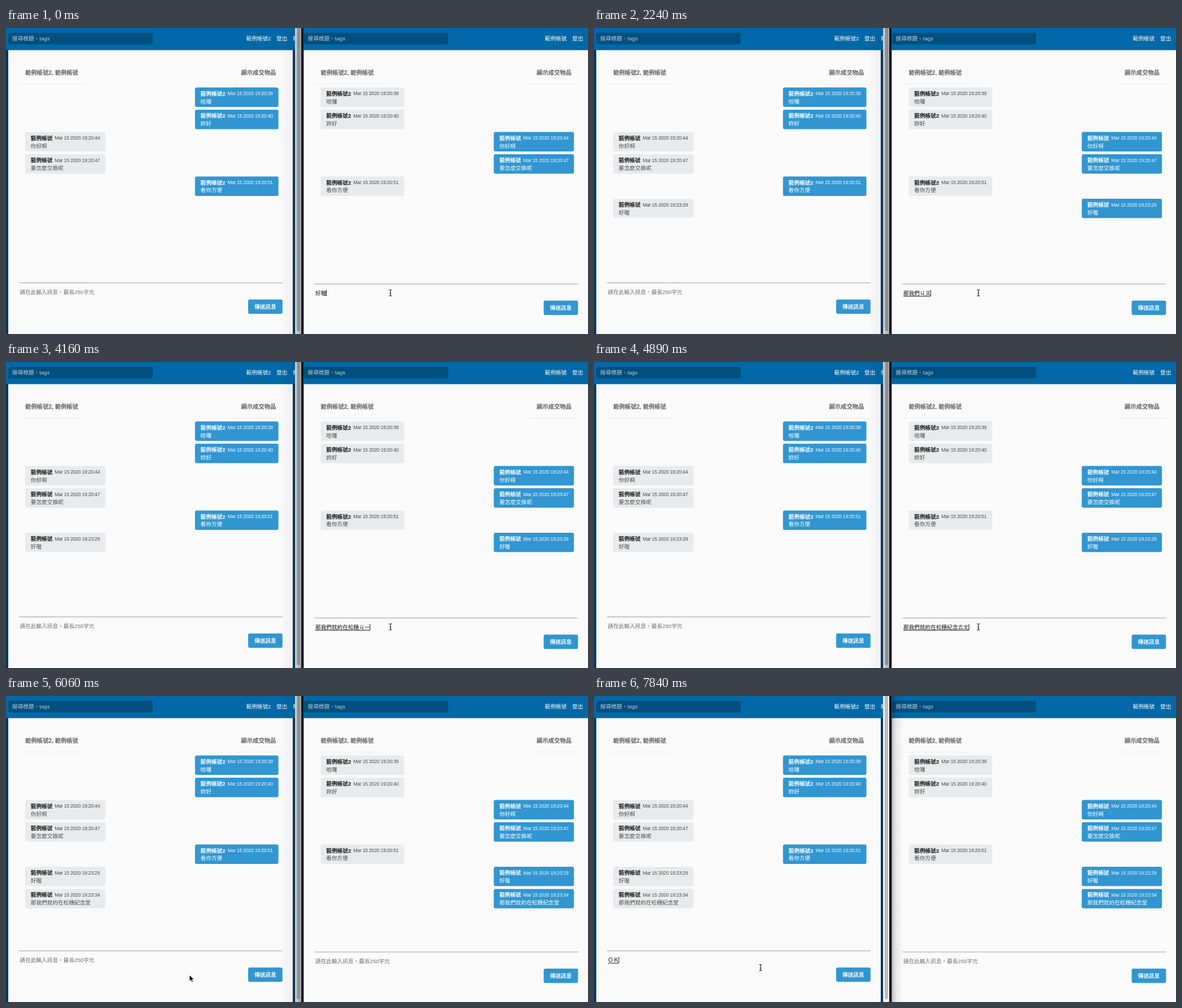
An HTML page that plays this animation: 1031x543 px, repeating every 8 s.

```html
<!DOCTYPE html>
<html lang="zh-Hant">
<head>
<meta charset="utf-8">
<title>Chat</title>
<style>
html, body { margin: 0; width: 100%; height: 100%; overflow: hidden; background: #fafafa; }
svg { display: block; width: 100vw; height: 100vh; }
text { font-family: "Liberation Sans", "Noto Sans CJK TC", "Noto Sans CJK", sans-serif; white-space: pre; }
</style>
</head>
<body>
<svg id="stage" viewBox="0 0 1031 543"></svg>
<script>
const LOOP = 8000, EM = 9.67, ROW = 39.47;
const ME = '範例帳號', PEER = '範例帳號2';
const HINT = '請在此輸入訊息，最長250字元';
const PLACE = '那我們就約在松穗紀念堂';

// sender, time, body, moment it appears
const chat = [
  [PEER, '19:20:39', '哈囉', 0],
  [PEER, '19:20:40', '妳好', 0],
  [ME, '19:20:44', '你好啊', 0],
  [ME, '19:20:47', '要怎麼交換呢', 0],
  [PEER, '19:20:51', '看你方便', 0],
  [ME, '19:23:29', '好喔', 450],
  [ME, '19:23:34', PLACE, 5330]
];

// moment, finished characters of PLACE, phonetic keys still being composed
const typing = [
  [890, 0, 'ㄋㄚ'], [1040, 1, ''],
  [1340, 1, 'ㄨ'], [1490, 2, ''],
  [1790, 2, 'ㄇㄣ'], [1940, 3, ''],
  [2240, 3, 'ㄐㄡ'], [2390, 4, ''], [2540, 4, 'ㄩㄝ'], [2680, 5, ''],
  [2980, 5, 'ㄗㄞ'], [3130, 6, ''], [3270, 6, 'ㄨ'], [3420, 6, 'ㄙㄨㄥ'], [3560, 7, ''],
  [3860, 7, 'ㄙㄨ'], [4010, 8, ''], [4150, 8, 'ㄐㄧ'], [4300, 9, ''],
  [4450, 9, 'ㄋㄧㄢ'], [4600, 10, ''], [4740, 10, 'ㄊ'], [4890, 10, 'ㄊㄤ'], [5030, 11, '']
];

// moment, x, y, shape
const pointer = [
  [0, 681, 470, 'beam'], [5620, 676, 480, 'arrow'], [5770, 548, 500, 'arrow'],
  [5910, 400, 505, 'arrow'], [6060, 325, 495, 'arrow'],
  [6210, 304, 487, 'arrow'], [6360, 295, 482, 'beam']
];

const latest = (list, t) => list.filter(s => s[0] <= t).pop();
const rect = (x, y, w, h, fill, r = 0) =>
  `<rect x="${x}" y="${y}" width="${w}" height="${h}" rx="${r}" fill="${fill}"/>`;
const label = (x, mid, s, fill, { size = EM, weight = 400, gap = 0 } = {}) =>
  `<text x="${x}" y="${mid + size * 0.37}" font-size="${size}" font-weight="${weight}" letter-spacing="${gap}" fill="${fill}">${s}</text>`;
const group = (id, body) => `<g id="${id}">${body}</g>`;
const shade = (id, x1, x2, stops) =>
  `<linearGradient id="${id}" gradientUnits="userSpaceOnUse" x1="${x1}" x2="${x2}" y1="0" y2="0">` +
  stops.map(([o, a]) => `<stop offset="${o}" stop-color="#000" stop-opacity="${a}"/>`).join('') + '</linearGradient>';

function bubble(dx, owner, [who, time, body], i) {
  const own = who === owner;
  const w = who === PEER ? 147.8 : 142;
  const x = dx + (own ? 482.6 - w : 34), y = 105.6 + i * ROW;
  const tx = x + 9.8;
  return group(`msg-${owner === ME ? 'r' : 'l'}${i}`,
    rect(x, y, w, 34.4, own ? '#3196d1' : '#e9eaec', 3) +
    label(tx, y + 10.5, who, own ? '#fff' : '#161616', { weight: 700 }) +
    label(tx + (who === PEER ? 48 : 42.4), y + 10.6, 'Mar 15 2020 ' + time, own ? '#f2f8fc' : '#4c4c4c', { size: 8.8, gap: -0.3 }) +
    label(tx, y + 24.4, body, own ? '#fff' : '#4c4c4c'));
}

function win(dx, dy, owner) {
  const head = { size: 10.3, weight: 700 };
  return rect(dx + 4, 39, 504, 504, '#fafafa') +
    rect(dx + 4, 0, 508, 39.3, '#0368a7') +
    rect(dx + 4, 8.5, 255.8, 20.5, '#014f7e', 3) +
    label(dx + 11, 18.7, '搜尋標題、tags', '#b9cbd8') +
    label(dx + 34, 79, `${PEER}, ${ME}`, '#626262', head) +
    label(dx + 416.5, 79, '顯示成交物品', '#626262', head) +
    rect(dx + 23, 99, 117, 1, '#ebebeb') +
    rect(dx + 404.5, 99, 85.5, 1, '#ebebeb') +
    chat.map((m, i) => bubble(dx, owner, m, i)).join('') +
    rect(dx + 23, 451.7 + dy, 467, 1, '#9b9b9b') +
    rect(dx + 429, 481.7 + dy, 60.8, 25.5, '#3196d1', 3) +
    label(dx + 440, 494.4 + dy, '傳送訊息', '#fff', { weight: 700 });
}

const stage = document.getElementById('stage');
stage.innerHTML =
  '<defs>' +
  shade('toLeft', 486, 523, [[0, 0], [0.6, 0.05], [1, 0.32]]) +
  shade('toRight', 523, 547, [[0, 0.5], [0.18, 0.25], [0.5, 0.08], [1, 0]]) +
  '<clipPath id="leftClip"><rect width="512.3" height="543"/></clipPath></defs>' +
  rect(0, 0, 1031, 543, '#fafafa') +
  '<g clip-path="url(#leftClip)">' +
  rect(0, 0, 513, 543, '#00375d') + rect(0, 0, 5, 39.3, '#0368a7') +
  win(0, 0, PEER) +
  label(425.5, 18.7, PEER, '#fff') + label(479, 18.7, '登出', '#fff') + label(508, 18.7, '新', '#fff') +
  '</g>' +
  rect(512.3, 0, 10.7, 543, '#f7f7f7') + rect(515, -6, 6, 544, '#bdbdbd', 3) +
  rect(523, 0, 4.7, 543, '#07192a') +
  win(523.5, 2, ME) +
  label(954.5, 18.7, ME, '#fff') + label(1003, 18.7, '登出', '#fff') +
  group('shadeL', rect(486, 0, 37, 543, 'url(#toLeft)')) +
  group('shadeR', rect(523, 0, 24, 543, 'url(#toRight)')) +
  group('inputL', '') + group('inputR', '') +
  group('beam', '<path d="M-2.5-5.5Q0-5.5 0-4Q0-5.5 2.5-5.5M0-4.5V4.5M-2.5 5.5Q0 5.5 0 4Q0 5.5 2.5 5.5M-1.3 1H1.3" fill="none" stroke="#111" stroke-width="1.1"/>') +
  group('arrow', '<path d="M0 0V11.2L2.6 8.8L4.4 13L6.3 12.2L4.6 8.1H8.1Z" fill="#000" stroke="#fff" stroke-width=".8"/>');

const $ = id => document.getElementById(id);
const show = (id, on) => $(id).setAttribute('visibility', on ? 'visible' : 'hidden');

// value null means the empty field with its hint
function field(x, mid, { value = null, line = false, caret = true }) {
  const w = value ? value.length * EM : 0;
  return (value === null ? label(x, mid, HINT, '#6e6e6e') : label(x, mid, value, '#111')) +
    (line ? rect(x, mid + 5, w, 1, '#111') : '') +
    (caret ? rect(x + w - 0.4, mid - 5.5, 1, 11, '#111') : '');
}

function rightInput(t) {
  if (t < 450) return { value: '好喔' };
  if (t < 890) return {};
  if (t >= 5330) return { caret: t < 5910 };
  const [, n, keys] = latest(typing, t);
  return { value: PLACE.slice(0, n) + keys, line: t < 5180 };
}

function leftInput(t) {
  if (t < 7390) return { caret: t >= 6650 && t < 7100 };
  return { value: t < 7840 ? 'Ｏ' : 'ＯＫ', line: true };
}

function draw(t) {
  chat.forEach((m, i) => ['l', 'r'].forEach(side => show(`msg-${side}${i}`, t >= m[3])));
  $('inputL').innerHTML = field(24.5, 468.5, leftInput(t));
  $('inputR').innerHTML = field(548, 470.5, rightInput(t));
  const leftFocus = t >= 6650;
  show('shadeL', !leftFocus);
  show('shadeR', leftFocus);
  const [, x, y, shape] = latest(pointer, t);
  for (const id of ['beam', 'arrow']) show(id, id === shape);
  $(shape).setAttribute('transform', `translate(${x} ${y})`);
}

const start = performance.now();
function tick() {
  draw((performance.now() - start) % LOOP);
  requestAnimationFrame(tick);
}
tick();
</script>
</body>
</html>
```
